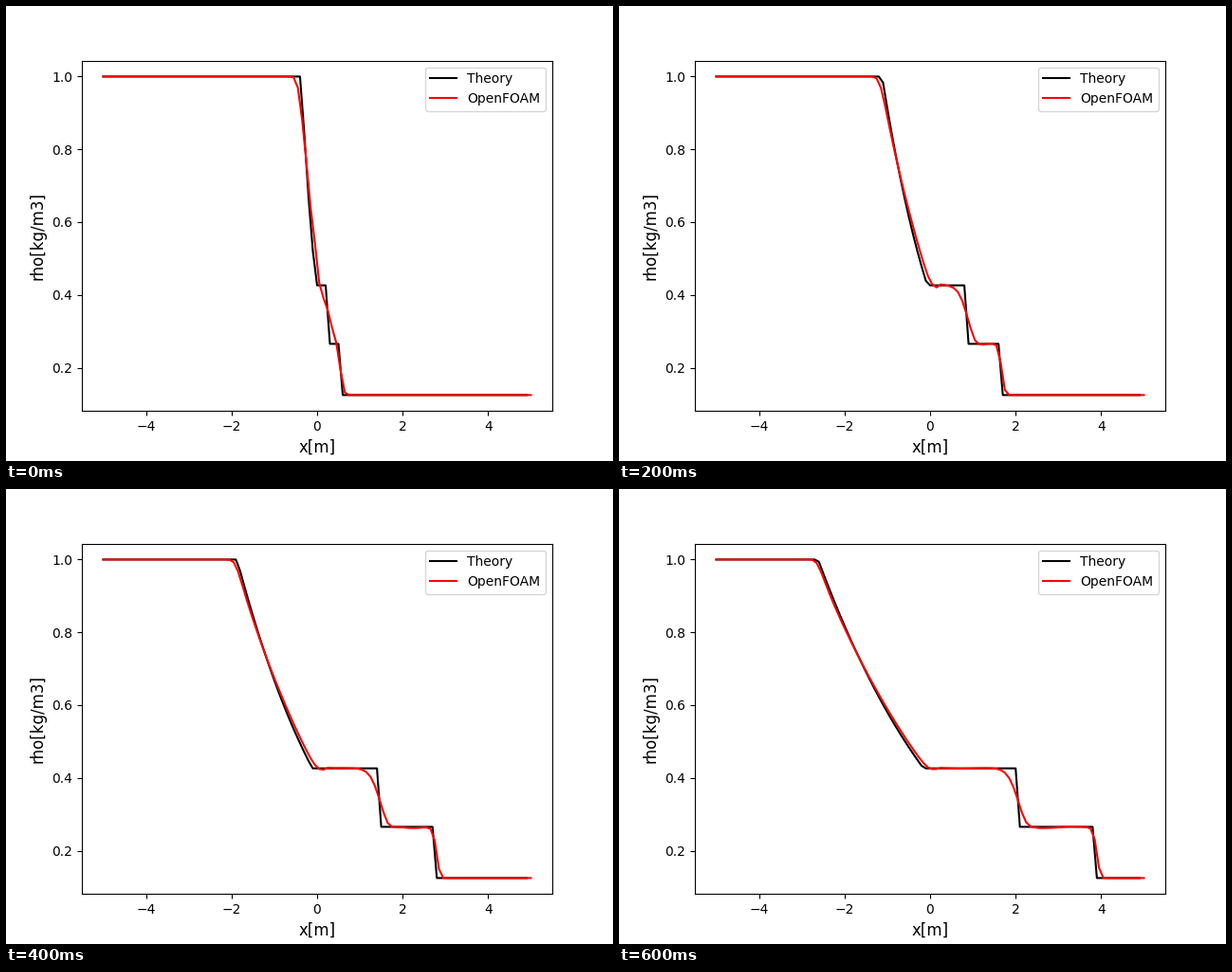
A matplotlib script for the animation above (0.7 s loop, 640 by 480 pixels).

```python
import numpy as np
import matplotlib.pyplot as plt
from matplotlib.animation import FuncAnimation

# Sod shock tube: exact Riemann solution against a central-upwind solver
GAMMA = 1.4
RHO_L, P_L = 1.0, 1e5
RHO_R, P_R = 0.125, 1e4
STEP = 1e-3
FRAMES = 7
CELLS, DX = 100, 0.1
MAX_CO = 0.2


def sound(p, rho):
    return np.sqrt(GAMMA * p / rho)


def star_state():
    """Pressure and velocity between the rarefaction and the shock."""
    c = sound(P_L, RHO_L)
    a = 2 / ((GAMMA + 1) * RHO_R)
    b = P_R * (GAMMA - 1) / (GAMMA + 1)
    lo, hi = P_R, P_L
    for _ in range(60):
        p = (lo + hi) / 2
        u_left = 2 * c / (GAMMA - 1) * (1 - (p / P_L) ** ((GAMMA - 1) / (2 * GAMMA)))
        u_right = (p - P_R) * np.sqrt(a / (p + b))
        if u_left > u_right:
            lo = p
        else:
            hi = p
    return p, u_left


def theory(x, t):
    p, u = star_state()
    c = sound(P_L, RHO_L)
    k = (GAMMA - 1) / (GAMMA + 1)
    rho_fan = RHO_L * (p / P_L) ** (1 / GAMMA)
    rho_shock = RHO_R * (p / P_R + k) / (k * p / P_R + 1)
    shock = u * rho_shock / (rho_shock - RHO_R)
    s = x / t
    u_fan = 2 / (GAMMA + 1) * (c + np.clip(s, -c, u))
    fan = RHO_L * (1 - (GAMMA - 1) / 2 * u_fan / c) ** (2 / (GAMMA - 1))
    zones = [s < -c, s < u - sound(p, rho_fan), s < u, s < shock]
    return np.select(zones, [RHO_L, fan, rho_fan, rho_shock], RHO_R)


def faces(v):
    """Van Leer limited values on the left and right of every face."""
    w = np.pad(v, 2, mode="edge")
    d = np.diff(w)
    prod = d[:-1] * d[1:]
    total = d[:-1] + d[1:]
    smooth = prod > 0
    half = np.where(smooth, prod / np.where(smooth, total, 1), 0)
    return w[1:-2] + half[:-1], w[2:-1] - half[1:]


def fluxes(rho, mom, rpsi):
    """Kurganov fluxes of mass, momentum and energy, and the top wave speed."""
    r, m, q, c = (np.array(faces(v)) for v in (rho, mom, rpsi, np.sqrt(GAMMA * rpsi)))
    u, p = m / r, r * q
    energy = p / (GAMMA - 1) + 0.5 * r * u ** 2
    ap = np.maximum((u + c).max(axis=0), 0)
    am = np.minimum((u - c).min(axis=0), 0)
    wt = ap / (ap - am)
    wt = np.array([wt, 1 - wt])
    diff = am * wt[0]
    vel = u * wt + np.array([-diff, diff])
    mass = (vel * r).sum(axis=0)
    momentum = (vel * m + wt * p).sum(axis=0)
    heat = (vel * (energy + p)).sum(axis=0) + diff * (p[0] - p[1])
    return (mass, momentum, heat), np.maximum(ap, -am).max()


def simulate():
    """Density in each cell at every output time."""
    left = np.arange(CELLS) < CELLS // 2
    rho = np.where(left, RHO_L, RHO_R)
    mom = np.zeros(CELLS)
    energy = np.where(left, P_L, P_R) / (GAMMA - 1)
    dt, out = 1e-6, []
    for _ in range(FRAMES):
        remaining = STEP
        while remaining > 1e-10:
            rpsi = (GAMMA - 1) * (energy - 0.5 * mom ** 2 / rho) / rho
            flux, speed = fluxes(rho, mom, rpsi)
            dt = min(1.2 * dt, MAX_CO * DX / speed)
            dt = remaining / np.ceil(remaining / dt - 1e-9)
            rho, mom, energy = (v - dt / DX * np.diff(f)
                                for v, f in zip((rho, mom, energy), flux))
            remaining -= dt
        out.append(rho)
    return out


x_theory = -5 + 0.1 * np.arange(100)
centres = -5 + DX * (np.arange(CELLS) + 0.5)
x_foam = np.concatenate([[-5], centres, [5]])
densities = simulate()

fig, ax = plt.subplots(figsize=(6.4, 4.8), dpi=100)
exact, = ax.plot([], [], color="black", label="Theory")
foam, = ax.plot([], [], color="red", label="OpenFOAM")
ax.set_xlim(-5.5, 5.5)
ax.set_ylim(0.08125, 1.04375)
ax.set_xlabel("x[m]", fontsize=12)
ax.set_ylabel("rho[kg/m3]", fontsize=12)
ax.legend(loc="upper right")


def update(i):
    exact.set_data(x_theory, theory(x_theory, (i + 1) * STEP))
    foam.set_data(x_foam, np.pad(densities[i], 1, mode="edge"))
    return exact, foam


anim = FuncAnimation(fig, update, frames=FRAMES, interval=100,
                     repeat=True, repeat_delay=0)
plt.show()
```
